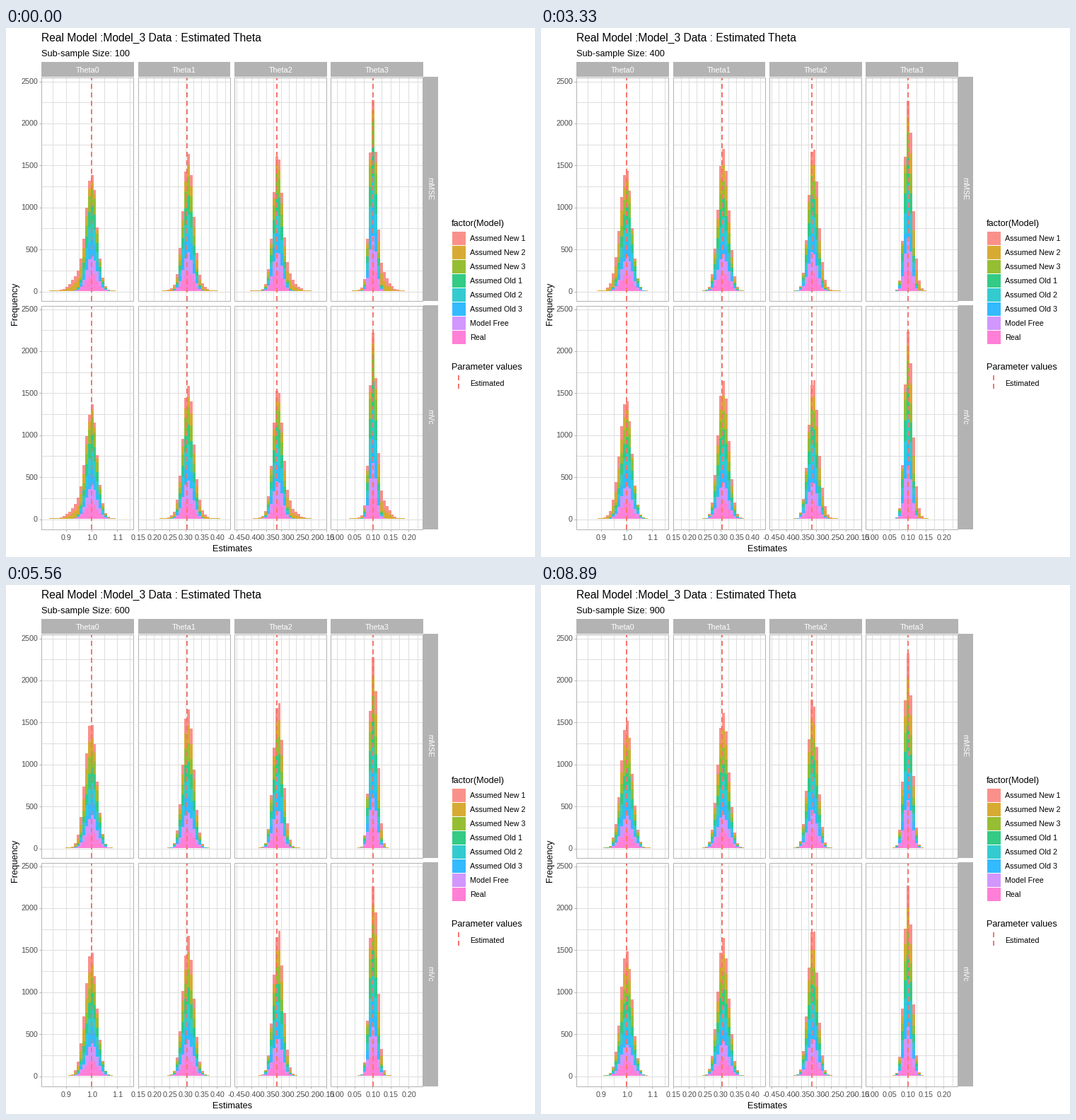
A matplotlib script that plays this animation: 748x748 px, repeating every 10000 ms.

```python
import math
from collections import namedtuple

import matplotlib.pyplot as plt
import numpy as np
from matplotlib.animation import FuncAnimation
from matplotlib.collections import LineCollection, PolyCollection
from matplotlib.patches import Rectangle

SIZE, DPI = 748, 88
PT = 72 / DPI  # points per pixel
GRID, GREY, INK, RED = "#DEDEDE", "#B3B3B3", "#4D4D4D", "#F8766D"

MODELS = [  # bottom of the stack first
    ("Real", "#FF61CC"), ("Model Free", "#C77CFF"),
    ("Assumed Old 3", "#00A9FF"), ("Assumed Old 2", "#00BFC4"),
    ("Assumed Old 1", "#00BE67"), ("Assumed New 3", "#7CAE00"),
    ("Assumed New 2", "#CD9600"), ("Assumed New 1", RED),
]

WIDTH, PITCH, HEIGHT = 129.9, 136.4, 316
BIN = WIDTH / 33  # 30 bins plus 5 % margin on either side
TOPS, BASE = (69, 392), (372, 694)
PER_COUNT = 0.1188
STAGES, TICKS, TICK_MS = 9, 200, 50

# start: pixel of the first tick; scale: pixels per unit; peak and spreads in bins;
# skew and flare: offset and extra spread of the two topmost models
Theta = namedtuple("Theta", "first step ticks start scale mark "
                            "peak narrow wide skew flare")
THETAS = [
    Theta(0.90, 0.10, 3, 85.1, 363, 1.0, 15.90, 1.90, 2.08, -3.3, 1.65),
    Theta(0.15, 0.05, 6, 187.2, 447, 0.305, 15.88, 1.72, 1.95, 0.5, 1.25),
    Theta(-0.45, 0.05, 7, 326.1, 423, -0.315, 13.40, 1.65, 1.75, 2.0, 1.6),
    Theta(0.00, 0.05, 5, 468.0, 508, 0.0995, 12.98, 1.13, 1.35, 2.1, 1.7),
]

erf = np.vectorize(math.erf)


def left(col):
    return 50.7 + PITCH * col


def bell(mean, sd):
    """Expected counts of 1000 normal draws in the 30 bins."""
    z = (np.arange(31) - 0.5 - mean) / (sd * math.sqrt(2))
    return 500 * np.diff(erf(z))


def histogram(row, col, size):
    """Counts per model and bin; skew and flare fade as the sample grows."""
    th = THETAS[col]
    sd = np.interp(size, [100, 900], [th.narrow * (1 + 0.04 * row), th.wide])
    core = bell(th.peak, sd)
    tail = bell(th.peak + th.skew * (1 - size / 1000),
                sd + th.flare * math.exp((100 - size) / 200))
    rng = np.random.default_rng(size + 10 * row + col)
    return rng.poisson(4 * np.array([core] * 6 + [tail] * 2)) / 4


def stack(row, col, size):
    """Step polygons of one panel, one per model."""
    edges = np.round(left(col) + BIN * (1.5 + np.arange(31)))
    xs = np.repeat(edges, 2)[1:-1]
    levels = np.vstack([np.zeros(30), np.cumsum(histogram(row, col, size), axis=0)])
    px = np.round(levels * PER_COUNT)
    px[-2:] = np.maximum(px[-2:], levels[-1] >= 1)  # keep rare counts visible
    ys = BASE[row] - np.repeat(px, 2, axis=1)
    return [np.column_stack([np.r_[xs, xs[::-1]], np.r_[hi, lo[::-1]]])
            for lo, hi in zip(ys, ys[1:])]


plt.rcParams["font.family"] = "Liberation Sans"
fig = plt.figure(figsize=(SIZE / DPI, SIZE / DPI), dpi=DPI, facecolor="white")
ax = fig.add_axes([0, 0, 1, 1])
ax.set(xlim=(0, SIZE), ylim=(SIZE, 0))
ax.axis("off")


def text(x, y, s, px=10.8, color="black", ha="left", va="baseline", **kw):
    return ax.text(x, y, s, fontsize=px * PT, color=color, ha=ha, va=va, **kw)


def lines(segments, color):
    ax.add_collection(LineCollection(segments, colors=color, linewidths=PT, zorder=1),
                      autolim=False)


def box(x0, y0, x1, y1, z=2, **kw):
    ax.add_patch(Rectangle((x0, y0), x1 - x0, y1 - y0, zorder=z, **kw))


def dashes(x, y0, y1):
    ax.plot([x, x], [y0, y1], color=RED, lw=2 * PT, ls=(0, (3.5, 2.5)), zorder=4)


def snap(v):
    """Centre of the pixel nearest to v."""
    return math.floor(v) + 0.5


def tick_x(th, i):
    return th.start + i * th.step * th.scale


def tick_y(row, i):
    return BASE[row] - 500 * i * PER_COUNT


def draw_panel(row, col):
    th = THETAS[col]
    x0, x1 = snap(left(col)), snap(left(col) + WIDTH)
    top, bottom = TOPS[row] + 0.5, TOPS[row] + HEIGHT + 0.5
    ys = [snap(tick_y(row, i / 2)) for i in range(11)]
    xs = [snap(tick_x(th, i / 2)) for i in range(-3, 2 * th.ticks + 2)]
    lines([[(x0, y), (x1, y)] for y in ys]
          + [[(x, top), (x, bottom)] for x in xs if x0 < x < x1], GRID)
    dashes(round(th.start + (th.mark - th.first) * th.scale), bottom, top)
    box(x0, top, x1, bottom, 5, fill=False, ec=GREY, lw=PT)


for row, name in enumerate(["mMSE", "mVc"]):
    top = TOPS[row]
    for col in range(4):
        draw_panel(row, col)
    box(590, top, 611, top + HEIGHT + 1, fc=GREY, lw=0)
    text(599.5, top + HEIGHT / 2, name, color="white", ha="center", va="center",
         rotation=270)
    for i in range(6):
        y = tick_y(row, i)
        lines([[(47, snap(y)), (50, snap(y))]], GREY)
        text(45, y + 4, str(500 * i), color=INK, ha="right")

for col, th in enumerate(THETAS):
    x0, x1 = left(col), left(col) + WIDTH
    box(math.floor(x0), 48, math.ceil(x1), 69, fc=GREY, lw=0)
    text((x0 + x1) / 2, 63, f"Theta{col}", color="white", ha="center")
    for i in range(th.ticks):
        x = tick_x(th, i)
        lines([[(snap(x), 709), (snap(x), 712)]], GREY)
        digits = 1 if th.step >= 0.1 else 2
        text(x, 724, f"{th.first + i * th.step:.{digits}f}", color=INK, ha="center")

text(50, 18.5, "Real Model :Model_3 Data : Estimated Theta", 15.6)
subtitle = text(50, 40, "", 12.8)
text(320, 740, "Estimates", 12.8, ha="center")
text(13, 389.5, "Frequency", 12.8, ha="center", va="center", rotation=90)

text(630, 280, "factor(Model)", 12.8)
for i, (name, color) in enumerate(reversed(MODELS)):
    y = 288 + 20 * i
    box(631, y, 650, y + 19, fc=color, alpha=0.8, lw=0)
    text(656, y + 13, name)
text(630, 483, "Parameter values", 12.8)
dashes(640, 510, 490)
text(656, 506, "Estimated")

layers = [ax.add_collection(PolyCollection([], facecolors=color, alpha=0.8, linewidths=0,
                                           antialiaseds=False, zorder=3),
                            autolim=False)
          for _, color in MODELS]


def build(size):
    """Polygons of all panels, grouped by model."""
    return list(zip(*(stack(row, col, size) for row in range(2) for col in range(4))))


stages = [build(100 * (s + 1)) for s in range(STAGES)]


def update(tick):
    stage = (STAGES * (tick + 1) - 1) // TICKS
    subtitle.set_text(f"Sub-sample Size: {100 * (stage + 1)}")
    for layer, polys in zip(layers, stages[stage]):
        layer.set_verts(polys)
    return [subtitle, *layers]


anim = FuncAnimation(fig, update, frames=TICKS, interval=TICK_MS, repeat=True,
                     repeat_delay=0)
plt.show()
```
